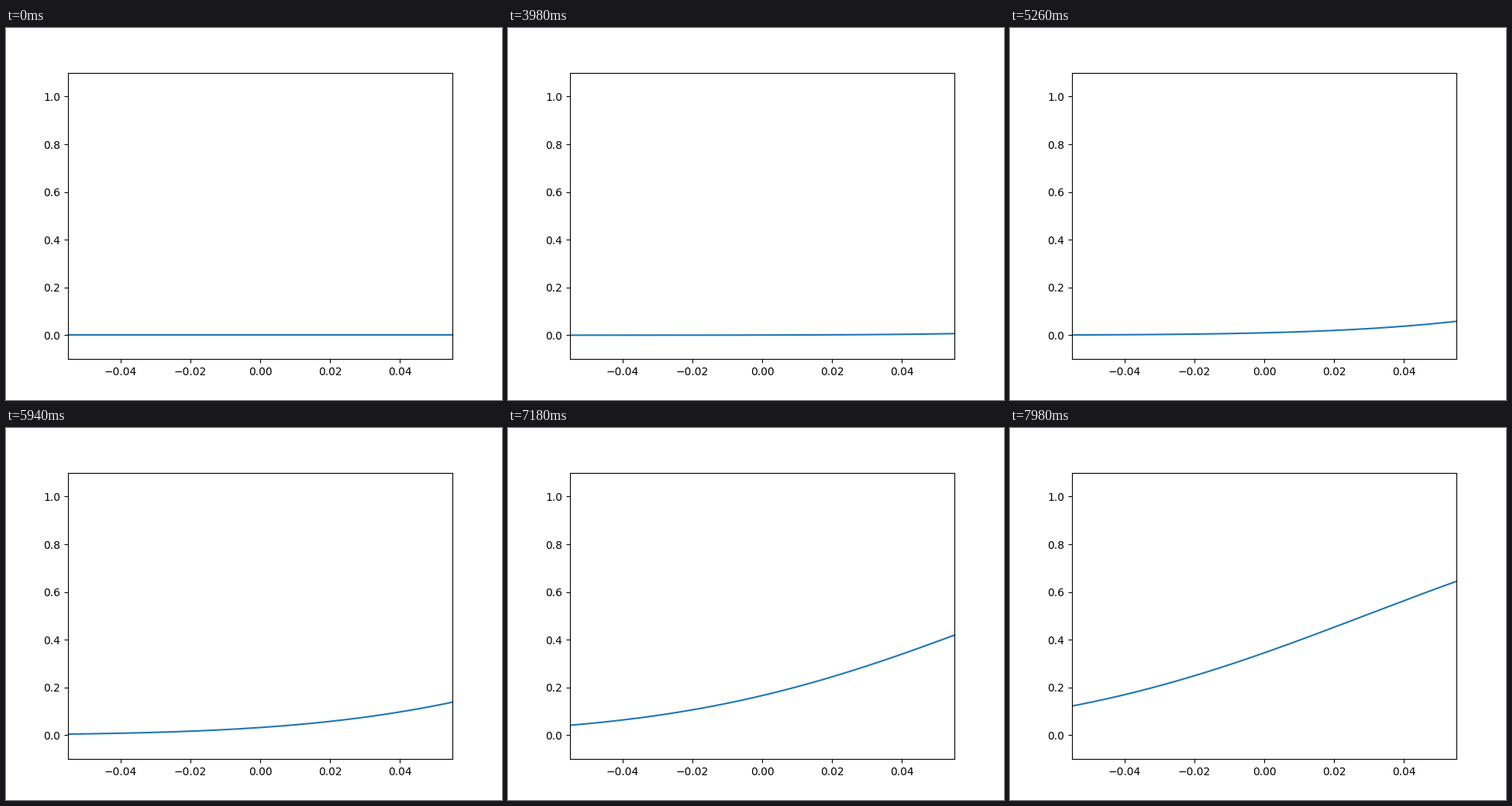
Animation, 640 px wide and 480 px high, one loop 8000 ms. Source, as a matplotlib script:

```python
import math

import matplotlib.pyplot as plt
import numpy as np
from matplotlib.animation import FuncAnimation

INTERVAL = 20       # ms per frame
FRAMES = 400        # 8 s loop
SPEED = 0.00205     # leftward travel per step; a step is two frames
LAST_STEP = 200
FLAT_STEPS = 13     # the line is still perfectly level before this step

erf = np.vectorize(math.erf)
x = np.linspace(-0.08, 0.08, 161)


def front(step):
    """Height of the smooth wave front arriving from the right."""
    s = x - SPEED * (LAST_STEP - step)
    z = -0.399 + 13.95 * s + 0.8 * s**2
    return 0.5 * (1 + erf(z / math.sqrt(2)))


fig, ax = plt.subplots(figsize=(6.4, 4.8), dpi=100)
ax.set_xlim(-0.055, 0.055)
ax.set_ylim(-0.1, 1.1)
line, = ax.plot(x, np.zeros_like(x), color="#1f77b4", lw=1.5)


def update(frame):
    step = (frame + 1) // 2
    level = step < FLAT_STEPS
    line.set_ydata(np.zeros_like(x) if level else front(step))
    line.set_snap(level)
    return line,


anim = FuncAnimation(fig, update, frames=FRAMES, interval=INTERVAL,
                     repeat=True, repeat_delay=0)
plt.show()
```
